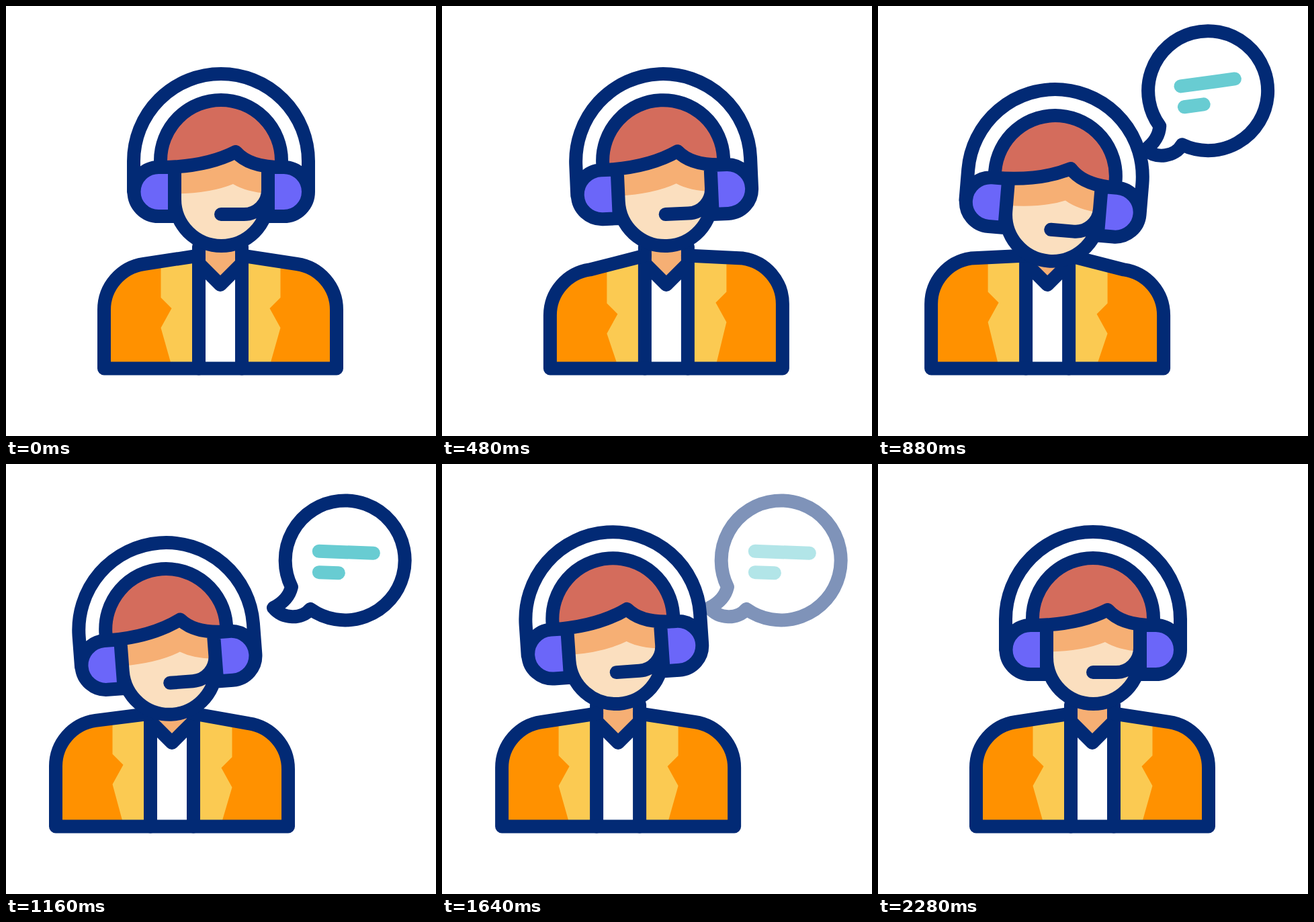
Write an HTML page that moves like this. It is 640x640 px and loops after 3 s.

```html
<!DOCTYPE html>
<html lang="en">
<head>
<meta charset="utf-8">
<title>Support agent</title>
<style>
  html, body { margin: 0; height: 100%; overflow: hidden; background: #fff; }
  svg { display: block; width: 100vw; height: 100vh; }
  .line { fill: none; stroke: #022a75; stroke-width: 20; stroke-linecap: round; stroke-linejoin: round; }
  .pill { fill: none; stroke: #68ccd2; stroke-width: 20; stroke-linecap: round; }
</style>
</head>
<body>
<svg viewBox="0 0 640 640">
  <g id="bubble">
    <path class="line" style="fill:#fff" d="M453 216A89 89 0 1 0 425 183C422 196 412 207 398 214C412 231 440 232 453 216Z"/>
    <path class="pill" d="M466 130L547 133M466 161.300L495 162.400"/>
  </g>
  <g id="body">
    <path id="jacket" fill="#ff9100"/>
    <path id="lapels" fill="#fbca52"/>
    <path fill="#fff" d="M287 383H351V540H287Z"/>
    <path fill="#f6af74" d="M287 345H351V383L319 415L287 383Z"/>
    <path class="line" d="M287 358V539.500M351 358V539.500M287 383L319 415L351 383"/>
    <path id="outline" class="line"/>
  </g>
  <g id="head">
    <path fill="#fff" d="M190 277V231A130 130 0 0 1 450 231V277Z"/>
    <path fill="#fbdfbf" d="M251 240V287.500a69.500 69.500 0 0 0 139 0V240Z"/>
    <path fill="#f6af74" d="M251 215H390V279Q358 277 338 265Q304 279 251 279.500Z"/>
    <path fill="#d46c5c" d="M230 240V230A90 90 0 0 1 410 230V240Q362 240 342 217Q297 240 230 240Z"/>
    <path fill="#6b66f9" d="M251 240H227a36.500 36.500 0 0 0 0 73H251ZM390 240H413.500a36.500 36.500 0 0 1 0 73H390Z"/>
    <path class="line" d="M190 277V231A130 130 0 0 1 450 231V277
      M230 240V230A90 90 0 0 1 410 230V240Q362 240 342 217Q297 240 230 240
      M251 240H227a36.500 36.500 0 0 0 0 73H251ZM390 240H413.500a36.500 36.500 0 0 1 0 73H390Z
      M251 240V287.500a69.500 69.500 0 0 0 139 0V240
      M320 310H354A36 36 0 0 0 390 274"/>
  </g>
</svg>
<script>
const LOOP = 3000, STEP = 40;
const $ = id => document.getElementById(id);
const ease = p => p * p * p * (10 + p * (6 * p - 15));

// Keys are [time, value] pairs, eased between neighbours.
function track(t, keys) {
  const i = keys.findIndex(k => k[0] > t);
  if (i === 0) return keys[0][1];
  if (i < 0) return keys[keys.length - 1][1];
  const [t0, a] = keys[i - 1], [t1, b] = keys[i];
  return a + (b - a) * ease((t - t0) / (t1 - t0));
}

const slide = [[120, 0], [350, 20], [1010, -72], [1320, -72], [2280, 0]];
const lean = [[120, 0], [350, 9.5], [1010, -9.5], [1240, 0]];
const tilt = [[120, 0], [350, -3], [1010, 5.2], [1200, -5], [1400, -5], [2100, 0]];
const nod = [[560, 0], [960, 24], [1440, 0]];
const swing = [[640, 0], [790, -12.5], [1060, 9.5], [1300, -12.5], [1540, 9.5], [1780, -12.5]];
const fade = [[600, 0], [760, 1], [1560, 1], [1720, 0]];

// One lapel; side is -1 for left, 1 for right.
function lapel(side, dy) {
  const points = [[32, 371], [89, 381 + dy], [89, 434 + dy], [73, 450 + dy], [89, 479 + dy], [74, 532], [32, 532]];
  return "M" + points.map(([x, y]) => [319.5 + side * x, y]).join("L") + "Z";
}

function draw(now) {
  const t = Math.floor(now % LOOP / STEP) * STEP;
  const x = track(t, slide), s = track(t, lean);

  $("body").setAttribute("transform", `translate(${x} 0)`);
  const left = `M287 371.5L205 ${384 + s}C171 ${389 + s} 146 ${418 + s} 146 ${452 + s}V539.5`;
  const right = `H492V${452 - s}C492 ${418 - s} 467 ${389 - s} 433 ${384 - s}L351 371.5`;
  $("outline").setAttribute("d", left + right);
  $("jacket").setAttribute("d", left + right + "Z");
  $("lapels").setAttribute("d", lapel(-1, s) + lapel(1, -s));

  $("head").setAttribute("transform",
    `translate(${x} ${track(t, nod)}) rotate(${track(t, tilt)} 320 360)`);

  $("bubble").setAttribute("transform", `rotate(${track(t, swing) - 2} 397 214)`);
  $("bubble").setAttribute("opacity", track(t, fade));
  requestAnimationFrame(() => draw(performance.now()));
}
draw(performance.now());
</script>
</body>
</html>
```
